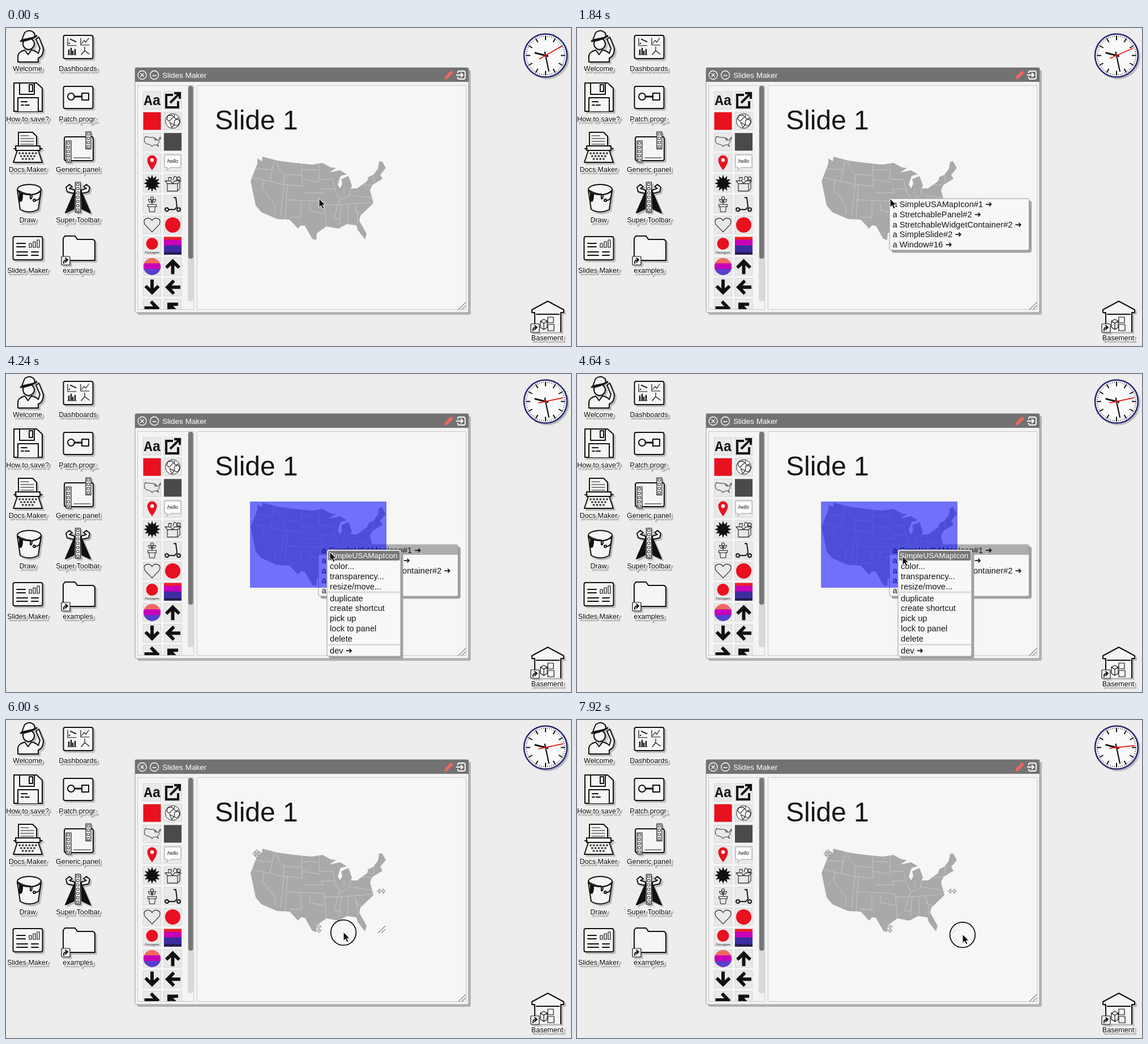
An HTML page for the animation above (8 s loop, 998 px wide and 561 px high).

```html
<!DOCTYPE html>
<html lang="en">
<head>
<meta charset="utf-8">
<title>Slides Maker</title>
<style>
html, body { margin: 0; width: 100%; height: 100%; overflow: hidden; background: #ededed; }
svg { display: block; width: 100vw; height: 100vh; }
text { font-family: "Liberation Sans", Arial, "DejaVu Sans", sans-serif; fill: #151515; white-space: pre; }
.desk { filter: drop-shadow(3px 3px 0 #bcbcbc); }
.ico { fill: #f5f5f5; stroke: #111; stroke-width: 2; stroke-linejoin: round; stroke-linecap: round; }
.thin { stroke-width: 1.2; }
.no { fill: none; }
.k { fill: #111; }
.label { font-size: 12.5px; text-anchor: middle; paint-order: stroke; stroke: #fff; stroke-width: 3px; stroke-linejoin: round; fill: #000; }
.menu { font-size: 14.67px; }
.menu .box { fill: #f8f8f8; stroke: #999; filter: drop-shadow(4px 4px 0 #a2a2a2); }
.head { font-size: 13.55px; fill: #fff; }
.line { fill: none; stroke: #222; stroke-width: 1.1; stroke-linejoin: round; }
</style>
</head>
<body>
<svg id="stage" viewBox="0 0 998 561" preserveAspectRatio="none"></svg>
<script>
const range = (n, f) => Array.from({ length: n }, (_, i) => f(i)).join('');
const rect = (x, y, w, h, more = '') => `<rect x="${x}" y="${y}" width="${w}" height="${h}" ${more}/>`;
const circle = (x, y, r, more = '') => `<circle cx="${x}" cy="${y}" r="${r}" ${more}/>`;
const path = (d, more = '') => `<path d="${d}" ${more}/>`;
const text = (x, y, s, more = '') => `<text x="${x}" y="${y}" ${more}>${s}</text>`;
const group = (more, body) => `<g ${more}>${body}</g>`;
const line = d => path(d, 'class="line"');

const coast = 'M453 227L480 234 510 238 540 241 559 238 574 246 583 247 571 255 590 251 602 258 591 261 586 276 590 283 594 275 592 267 605 261 611 278 609 283 620 283 638 270 640 263 649 259 657 248 659 236 664 235 671 247 661 259 665 266 647 277 643 286 649 309 626 331 624 340 637 363 634 373 621 356 619 348 602 346 587 354 566 350 549 362 548 374 541 372 528 349 521 348 516 354 501 338 479 337 451 325 441 313 432 270 444 239 444 230 452 235Z';
const west = 'M441 248L471 250M436 264L491 276M456 268L453 283 475 313V328M474 233L466 270M478 235L483 250 491 258V276L485 331M491 258L522 260V239M491 276L523 279V260M497 276L493 337M494 303L561 306M521 306V334H501';
const east = 'M523 250H550M523 267L554 272M527 291H561L556 284H580M536 309V322L562 327M553 240V267H577M562 306L566 350M562 312H586L579 337H590M577 267L582 289 590 302 586 312M597 283V295M608 283V295L590 304M588 312L648 307M592 312L589 346M604 311V344M616 311L621 331V346M612 295L645 300M629 277H645M650 260V271M616 322L629 329';
const border = d => path(d, 'fill="none" stroke="#cfcfcf" stroke-width=".8"');
const usa = path(coast, 'fill="#a9a9a9"') + border(west) + border(east);

// Desktop icons
const shortcut = (x, y) => rect(x, y, 15, 15, 'rx="1" class="thin"') + path(`M${x + 4} ${y + 12}q-1-6 6-6m-3-3l4 3-4 4`, 'class="no"');
const strip = (x, y, n) => rect(x, y, 9, n * 7.6, 'class="thin"') + range(n, i => rect(x + 2.5, y + 2 + i * 7.5, 4, 4, 'stroke-width=".9"'));
let icons = '';
function icon(x, y, name, art) {
  icons += group('class="desk"', group('class="ico"', art) + text(x, y, name, 'class="label"'));
}
icon(38, 76, 'Welcome',
  path('M21 60V49Q22 42 33 39L39 47 45 39Q53 40 57 45L60 36 53 20 58 16 66 36Q66 50 57 53V60Z') + circle(40, 28, 10) +
  path('M28 21L33 8Q42 1 50 9L51 16Z') + path('M26 23Q39 23 54 14', 'class="no" stroke-width="3"'));
icon(127, 76, 'Dashboards',
  rect(101.5, 13, 52, 41, 'rx="3"') + group('class="thin"',
    path('M109 18V31H124M132 18V30H147M134 27L138 22 141 25 146 18M109 47H124M139 33V40L133 47M139 40L147 46', 'class="no"') +
    range(6, i => circle(112 + i * 2.2, 27 - i * 7 % 8, .6)) + path('M111 46V39M115 46V36M118 46V41M122 46V38', 'stroke-width="2.4"')));
icon(38, 165, 'How to save?',
  path('M14 97H54L64 106V147H14Z') + path('M24 97H50V117H24ZM21 147V123H57V147') + rect(41, 100, 6, 12) +
  path('M27 130H37M27 136H31M34 136H41', 'class="no"'));
icon(127, 165, 'Patch progr.',
  rect(101.5, 103, 52, 39, 'rx="3"') + circle(115, 121, 6) + rect(134, 115, 12, 12) + path('M121 121H134', 'stroke-width="3"'));
icon(38, 254, 'Docs Maker',
  path('M22 210V184H47L54 191V210Z') + range(4, i => path(`M26 ${190 + i * 5}H${i ? 49 : 40}`, 'class="thin"')) +
  path('M17 208H60V216H17ZM14 213H18M60 213H64M20 216H57L64 237H13Z') +
  range(3, r => range(6 - r, i => circle(24 + i * 5.8 + r * 2.8, 221 + r * 5, 1.2, 'class="thin"'))));
icon(127, 254, 'Generic panel',
  rect(103, 192, 51, 42, 'rx="3"') + path('M120 229H149', 'class="thin"') + strip(106, 199, 5) + strip(141, 183, 4));
icon(38, 343, 'Draw',
  path('M20 286L25 320Q41 329 57 320L62 286Z') + '<ellipse cx="41" cy="285" rx="21" ry="9"/>' +
  path('M21 286Q32 293 43 293V301Q46 303 46 294Q55 293 61 287Q62 305 51 304', 'class="no"') +
  path('M24 289V305Q29 309 29 292', 'class="k"') + circle(50, 304, 2));
const arm = path('M121 292L108 289 106 281 112 276 117 280 112 283 121 286Z') + path('M121 289L105 326 120 319Z', 'class="k"');
icon(127, 343, 'Super Toolbar', arm + group('transform="translate(254 0) scale(-1 1)"', arm) + strip(122.5, 272, 7));
icon(38, 432, 'Slides Maker',
  rect(12.5, 368, 52, 41, 'rx="3"') + path('M19 380H34M19 386H34M19 395H38M19 401H38M45 395H57M45 401H57', 'class="no"') +
  range(3, i => rect(41 + i * 7, 380 - i * 3, 4, 7 + i * 3, 'class="thin"')));
icon(127, 432, 'examples', path('M101 371L104 367H122L126 373H154L157 376V410H101Z') + shortcut(98, 403));
icon(956, 551, 'Basement',
  path('M934 536V502H929V497L957 482 985 497V502H980V536') + path('M937 505H977', 'class="no"') +
  group('class="thin"', rect(957, 510, 10, 10) + rect(957, 523, 11, 11) +
    path('M944 517L950 514 956 517V528L950 532 944 528ZM944 517L950 521 956 517M950 521V532')) + shortcut(927, 522));

// Clock
const hand = (deg, len, tail, w, color, id = '') =>
  `<line ${id} y1="${tail}" y2="${-len}" stroke="${color}" stroke-width="${w}" transform="rotate(${deg})"/>`;
const clock = group('transform="translate(953 48.5)"',
  circle(3, 3, 39, 'fill="#bdbdbd"') + circle(0, 0, 38, 'fill="#fafafa" stroke="#282875" stroke-width="2.6"') +
  range(60, i => hand(i * 6, 35, i % 5 ? -33 : -27, i % 5 ? .8 : 2, '#111')) +
  hand(284, 20, 5, 3, '#111') + hand(168, 29, 7, 2.2, '#111') + hand(60, 32, 13, 1.7, '#e51414', 'id="second"') + circle(0, 0, 2, 'fill="#e51414"'));

// Tool palette: two columns of 31px cells, filled in order
let tools = '', cells = 0;
function tool(art) {
  tools += group(`transform="translate(${242.5 + cells % 2 * 36.5} ${112 + (cells >> 1) * 36.65})"`,
    rect(0, 0, 31, 31, 'fill="#e9e9e9" stroke="#d5d5d5"') + art);
  cells++;
}
const fill = (color, more = '') => rect(0, 0, 31, 31, `fill="${color}" ${more}`);
const band = (y, color) => rect(0, y, 31, 31 - y, `fill="${color}"`);
const burst = 'M' + Array.from({ length: 24 }, (_, i) => {
  const r = i % 2 ? 9 : 15, a = i * Math.PI / 12;
  return (15.5 + r * Math.sin(a)).toFixed(1) + ' ' + (15.5 - r * Math.cos(a)).toFixed(1);
}).join('L') + 'Z';
tool(text(1, 24, 'Aa', 'font-size="25" font-weight="700" style="font-family:\'Liberation Mono\',monospace"'));
tool(path('M16 6H4V28H25V17M11 20L27 4M18 3H28V13', 'fill="none" stroke="#111" stroke-width="4"'));
tool(fill('#e9101f'));
tool(circle(15.5, 15.5, 13, 'fill="#f8f8f8" stroke="#222"') + line('M7 6L14 5 17 8 9 16 5 12ZM10 18L18 22 14 27ZM19 4L18 9 21 12 26 10M19 14L25 12 28 17 24 24 18 22Z'));
tool(group('transform="translate(-51 -21.5) scale(.122)"', path(coast, 'fill="none" stroke="#222" stroke-width="8"')));
tool(fill('#4a4a4a'));
tool(path('M15.5 29Q7 18 7 11A8.5 8.5 0 0 1 24 11Q24 18 15.5 29Z', 'fill="#e51420"') + circle(15.5, 11, 3.2, 'fill="#fff"'));
tool(path('M3 2H28Q30 2 30 4V22Q30 24 28 24H11L5 29 6 24H3Q1 24 1 22V4Q1 2 3 2Z', 'fill="#fff" stroke="#999"') +
  text(15.5, 16, 'hello', 'font-size="9" font-style="italic" text-anchor="middle"'));
tool(path(burst, 'fill="#111"'));
tool(line('M6 16H24V29H6ZM24 16L28 13V25L24 29M6 16L2 11H12L15 16 19 11H30L24 16M8 10V5H13V10M16 10L18 3 23 5 22 10') + circle(26, 7, 3, 'class="line"'));
tool(line('M8 16H23V20H8ZM10 20L11 29H20L21 20M15.5 16V8M15.5 12Q9 13 9 7Q14 7 15.5 12Q22 13 22 7Q17 7 15.5 12') + circle(15.5, 5, 2.5, 'class="line"'));
tool(group('fill="none" stroke="#111" stroke-width="1.9"', circle(5, 25, 3) + circle(26, 25, 3) + path('M8 25H19L23 20 21 4H17')));
tool(line('M15.5 28L3 15Q-1 6 6 4Q12 2 15.5 8Q19 2 25 4Q32 6 28 15Z'));
tool(circle(15.5, 15.5, 13.5, 'fill="#e9101f"'));
tool(circle(15.5, 12, 10.5, 'fill="#e9101f"') + text(15.5, 29, 'Fizzygum', 'font-size="6" text-anchor="middle"'));
tool(band(0, '#ed2024') + band(5, '#c800b8') + band(15, '#3b2da0') + band(27, '#20204a'));
tool(group('clip-path="url(#disc)"', band(0, '#f0695f') + band(10, '#c800b8') + band(20, '#5540d0')));
for (const deg of [0, 180, -90, 90, -45])
  tool(path('M15.5 2L29 15.5 25 19.5 18.5 13.5V29H12.5V13.5L6 19.5 2 15.5Z', `fill="#111" transform="rotate(${deg} 15.5 15.5)"`));

const grip = (x, y) => path(`M${x} ${y}l13 -13M${x + 6} ${y}l7 -7`, 'fill="none" stroke="#888" stroke-width="1.3"');
let appWindow = rect(232, 74, 589, 432, 'rx="3" fill="#b3b3b3"') + rect(228, 70, 589, 432, 'rx="3" fill="#f3f3f3" stroke="#999"');
appWindow += rect(228, 70, 589, 25, 'fill="#727272"') + text(276, 88, 'Slides Maker', 'class="head"');
appWindow += group('fill="none" stroke="#fff" stroke-width="1.3"', circle(240.5, 83, 7.5) + circle(262, 83, 7.5) +
  path('M237.5 80l6 6m0-6l-6 6M258.5 84h7') +
  path('M798 80V78Q798 76 800 76H808Q811 76 811 79V87Q811 90 808 90H800Q798 90 798 87V86M795 83H806M803 79L807 83 803 87', 'stroke-width="1.8"'));
appWindow += path('M774 91L776 85 786 75 790 79 780 89Z', 'fill="#f0685e"');
appWindow += rect(232.5, 101.5, 99, 395, 'fill="#f4f4f4" stroke="#c8c8c8"') + rect(337.5, 101.5, 475, 395, 'fill="#f6f6f6" stroke="#c8c8c8"');
appWindow += group('clip-path="url(#palette)"', tools);
appWindow += rect(321, 102, 10, 380, 'rx="4" fill="#d9d9d9"') + rect(322, 102, 8.5, 305, 'rx="4" fill="#777"');
appWindow += text(369, 179, 'Slide 1', 'font-size="48"') + usa + grip(799, 497);

// Menus
const parents = ['SimpleUSAMapIcon#1', 'StretchablePanel#2', 'StretchableWidgetContainer#2', 'SimpleSlide#2', 'Window#16'];
const actions = ['color...', 'transparency...', 'resize/move...', 'duplicate', 'create shortcut', 'pick up', 'lock to panel', 'delete', 'dev ➜'];
const actionY = i => 344 + i * 17.9 + (i > 2) * 2.8 + (i > 7) * 2.8;
const parentMenu = group('id="parents" class="menu"',
  rect(552, 301, 246.5, 91, 'rx="3" class="box"') + rect(552.5, 301.5, 245.5, 17.5, 'id="parentRow" fill="#adadad"') +
  parents.map((s, i) => text(557.5, 316 + i * 17.8, `a ${s} ➜`)).join(''));
const glow = rect(431, 225, 241, 152, 'id="glow" fill="#00f" opacity=".54"');
const actionMenu = group('id="actions" class="menu"',
  rect(567, 310, 130, 188, 'rx="3" class="box"') + rect(569, 312, 126.5, 17, 'rx="2" fill="#777"') +
  text(570, 325, 'SimpleUSAMapIcon', 'class="head"') + rect(568, 0, 128.5, 17.8, 'id="actionRow" fill="#adadad"') +
  path('M568 385H696M568 477.5H696', 'stroke="#dcdcdc" stroke-width="3"') + actions.map((s, i) => text(572, actionY(i), s)).join(''));

// Resize handles around the map
const twoWay = (x, y, deg) => path('M-7 0L-3 -4V-1H3V-4L7 0 3 4V1H-3V4Z', `fill="#eee" transform="translate(${x} ${y}) rotate(${deg})"`);
const handles = group('id="handles" fill="none" stroke="#999" stroke-width="1.1"',
  twoWay(443, 236, 0) + twoWay(443, 236, 90) + twoWay(663, 302, 0) + twoWay(553, 368, 90) + group('id="corner"', grip(657, 376)));

const pointer = group('id="pointer"', circle(0, 1, 22.3, 'id="ring" fill="none" stroke="#111" stroke-width="1.8"') +
  path('M0 0V15.5L3.6 12.2 6.2 18 9 16.8 6.4 11.2H11Z', 'fill="#111" stroke="#fff"'));

const stage = document.getElementById('stage');
stage.innerHTML =
  `<defs><clipPath id="palette">${rect(233, 102, 88, 394)}</clipPath><clipPath id="disc">${circle(15.5, 15.5, 15)}</clipPath></defs>` +
  rect(0, 0, 998, 561, 'fill="#ededed"') + icons + clock + appWindow + parentMenu + glow + actionMenu + handles + pointer;

const el = Object.fromEntries([...stage.querySelectorAll('[id]')].map(e => [e.id, e]));
const show = (id, on) => el[id].setAttribute('visibility', on ? 'inherit' : 'hidden');

// Pointer stops: time, x, y
const route = [[0, 553, 301], [2160, 553, 301], [2640, 567, 308], [3680, 567, 308], [4080, 572, 314], [4560, 572, 314],
  [5200, 596, 374], [6240, 596, 374], [6880, 652, 370], [7120, 664, 371], [7520, 664, 371], [7920, 681, 378], [8000, 681, 378]];
const presses = [[720, 1280], [2880, 3440], [5600, 6080], [7360, 8000]];
const between = (t, a, b) => t >= a && t < b;

function pointerAt(t) {
  const i = route.findIndex(p => p[0] > t), [t0, x0, y0] = route[i - 1], [t1, x1, y1] = route[i];
  const k = (t - t0) / (t1 - t0);
  return [x0 + (x1 - x0) * k, y0 + (y1 - y0) * k];
}

function draw(now) {
  const t = Math.floor(now % 8000 / 80) * 80;
  const [x, y] = pointerAt(t);
  el.pointer.setAttribute('transform', `translate(${x} ${y})`);
  el.second.setAttribute('transform', `rotate(${60 + 6 * Math.floor((t + 1800) / 2000)})`);
  const hover = between(t, 2240, 4720), row = Math.floor((y - 331) / 17.8);
  show('ring', presses.some(p => between(t, ...p)));
  show('parents', between(t, 1040, 6000));
  show('parentRow', hover);
  show('glow', hover);
  show('actions', between(t, 3360, 6000));
  show('actionRow', between(t, 4560, 6000) && row >= 0);
  el.actionRow.setAttribute('y', 331 + row * 17.8);
  show('handles', t >= 6000);
  el.corner.setAttribute('opacity', t >= 7360 ? .25 : 1);
  requestAnimationFrame(draw);
}
requestAnimationFrame(draw);
</script>
</body>
</html>
```
